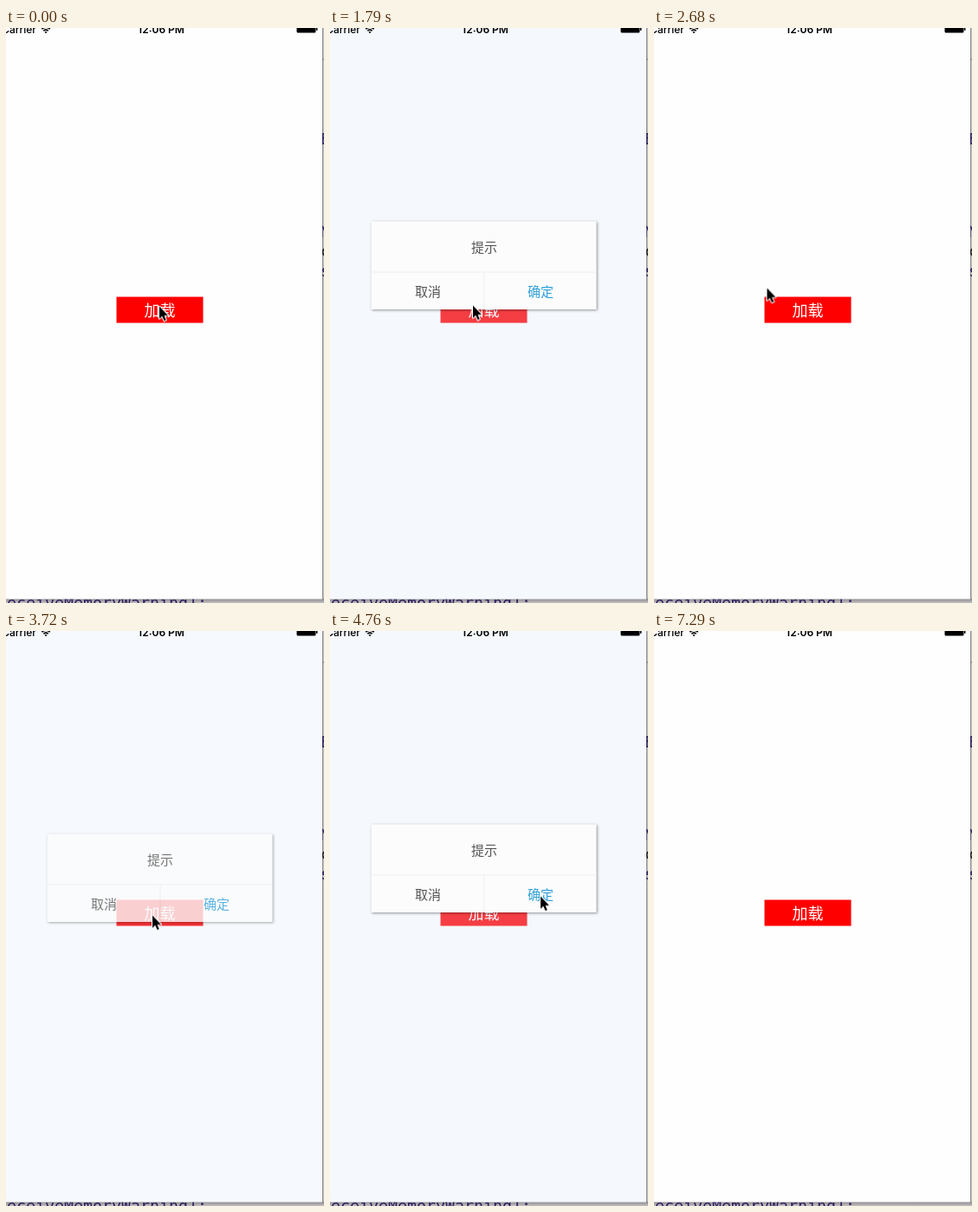
Write an HTML page that moves like this. It is 367 px wide and 662 px high and loops after 7730 ms.

```html
<!DOCTYPE html>
<html lang="zh-CN">
<head>
<meta charset="utf-8">
<title>Alert</title>
<style>
  @property --p { syntax: "<number>"; inherits: true; initial-value: 0; }

  html, body { margin: 0; width: 100%; height: 100%; overflow: hidden; background: #fff; }
  svg { display: block; width: 367px; height: 662px; }
  text { white-space: pre; }
  .status { font: 500 12px Inter, sans-serif; }
  .code { font: 18.27px "DejaVu Sans Mono", monospace; fill: #2a1d5c; }
  .label { font: 400 15px "Noto Sans CJK SC", "Noto Sans CJK", sans-serif; fill: #555; text-anchor: middle; }
  .load { font-size: 18px; font-weight: 300; fill: #fff; }

  .popup { animation: show 7730ms step-end infinite; }
  .tint { opacity: var(--p); }
  .dialog { opacity: var(--p); transform: translateY(calc((1 - var(--p)) * 50px)); }
  .card { filter: drop-shadow(1.2px 1.4px 1.6px rgba(0, 0, 0, .42)); }
  .cursor { animation: move 7730ms step-end infinite; }

  /* --p is how far the alert is open */
  @keyframes show {
    0% { --p: 0; }
    3.75% { --p: .92; }
    5.69% { --p: 1; }
    30.78% { --p: .9; }
    32.72% { --p: .06; }
    34.66% { --p: 0; }
    48.12% { --p: .78; }
    50.06% { --p: 1; }
    76.97% { --p: .06; }
    78.91%, 100% { --p: 0; }
  }

  @keyframes move {
    0% { transform: translate(177px, 320.5px); }
    23.15% { transform: translate(165px, 319.5px); }
    25.09% { transform: translate(144.5px, 309.5px); }
    26.9% { transform: translate(130.5px, 299.5px); }
    38.42% { transform: translate(130.5px, 304px); }
    40.36% { transform: translate(143.5px, 319px); }
    42.3% { transform: translate(165.5px, 327px); }
    44.24% { transform: translate(169px, 327.5px); }
    55.88% { transform: translate(198.5px, 325px); }
    57.82% { transform: translate(230px, 312px); }
    59.76% { transform: translate(237px, 307px); }
    61.57% { transform: translate(243px, 305.5px); }
    86.67% { transform: translate(252.5px, 414px); }
    88.48% { transform: translate(276.5px, 647px); }
    92.36% { transform: translate(283px, 652px); }
    94.3%, 100% { transform: translate(283px, 700px); }
  }
</style>
</head>
<body>
<svg viewBox="0 0 367 662">
  <defs>
    <linearGradient id="under" x2="0" y2="1">
      <stop stop-color="#8c898c"/>
      <stop offset="1" stop-color="#c2bfc2"/>
    </linearGradient>
  </defs>

  <!-- editor behind the phone -->
  <rect width="367" height="662" fill="#c9c7cb"/>
  <rect y="657" width="367" height="5" fill="url(#under)"/>
  <path d="M365.5 0V658" stroke="#8b898d"/>
  <path d="M365 36H367" stroke="#777"/>
  <g class="code">
    <text x="-10" y="668">ReceiveMemoryWarning];</text>
    <text x="363" y="134">E</text>
    <text x="363" y="241">M</text>
    <text x="363" y="263" fill="#222">c</text>
    <text x="363" y="286">s</text>
  </g>

  <!-- phone screen -->
  <rect width="365" height="657.5" fill="#fefefe"/>
  <rect x="127.5" y="309.5" width="100" height="30" fill="#f00"/>
  <text class="label load" x="177.5" y="331.5">加载</text>

  <g class="popup">
    <rect class="tint" width="365" height="657.5" fill="#d8e6f8" fill-opacity=".27"/>
    <g class="dialog">
      <rect class="card" x="47.5" y="222.5" width="260" height="101.5" fill="#fcfcfc"/>
      <path d="M47.5 281H307.5M178 281V324" stroke="#efefef"/>
      <text class="label" x="178" y="257.7">提示</text>
      <text class="label" x="113" y="308.7">取消</text>
      <text class="label" x="243" y="308.7" style="fill:#2c9fd9">确定</text>
    </g>
  </g>

  <!-- status bar -->
  <text class="status" x="35" y="6" text-anchor="end">Carrier</text>
  <text class="status" x="179" y="6" text-anchor="middle" style="font-weight:600">12:06 PM</text>
  <g fill="none" stroke="#000" stroke-width="1.6">
    <path d="M41.3 1.2A6.6 6.6 0 0 1 50.7 1.2M43.3 3.3A3.8 3.8 0 0 1 48.7 3.3"/>
    <path d="M46 6.2L44.6 4.7A2 2 0 0 1 47.4 4.7Z" fill="#000" stroke="none"/>
  </g>
  <rect x="335.5" y="-4" width="22" height="9.5" rx="1.5"/>
  <rect x="358" y="-1" width="1.5" height="4" rx=".7"/>

  <path class="cursor" d="M0 0V14.3L3.2 11.3 5.6 16.6 7.8 15.7 5.5 10.4H10Z"
        stroke="#fff" stroke-width="2" stroke-linejoin="round" paint-order="stroke"/>
</svg>
</body>
</html>
```
